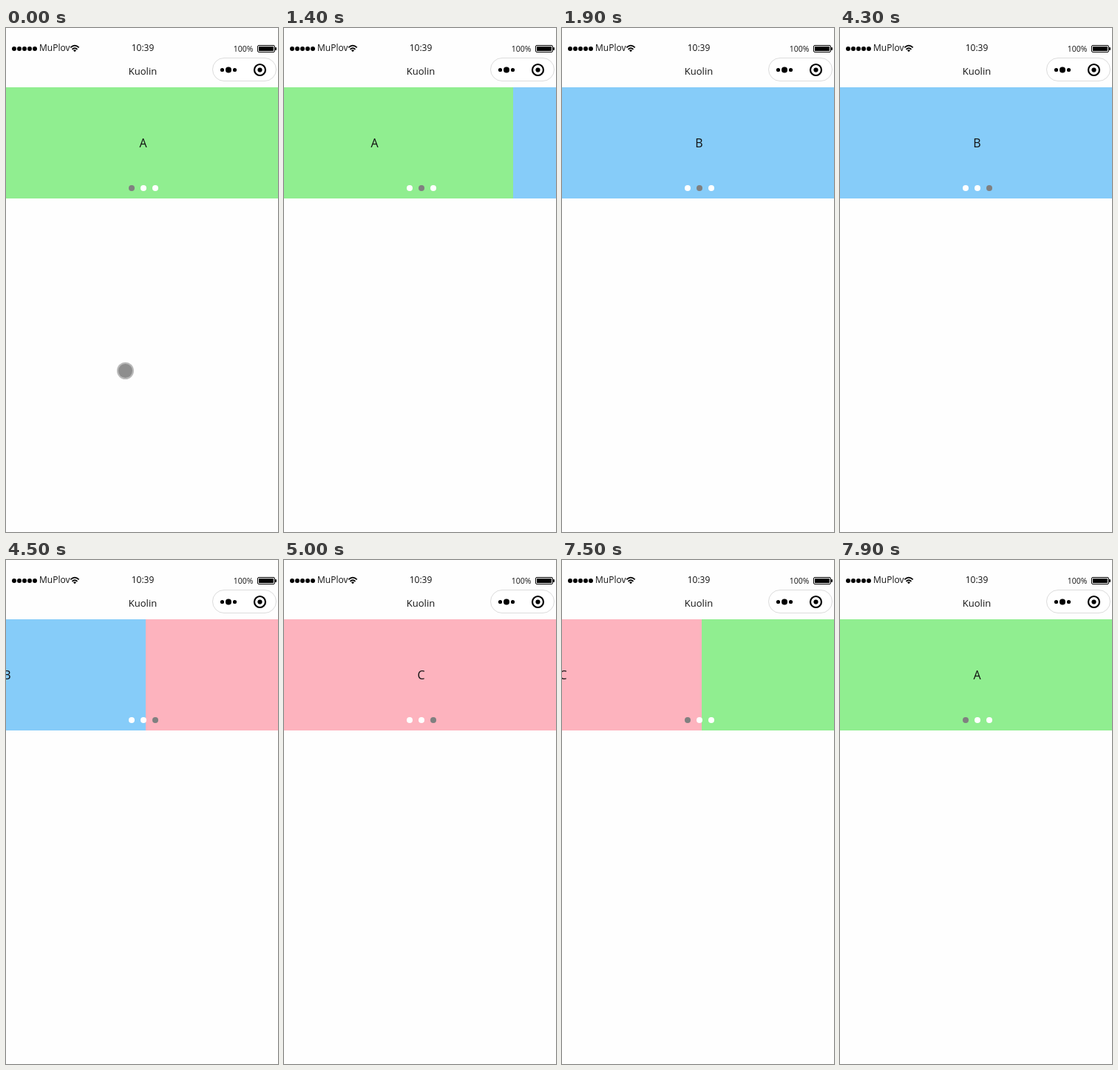
Recreate the animation shown at these times as an HTML page. Size 368 by 680 pixels, loop 8.1 s.

```html
<!DOCTYPE html>
<html lang="en">
<head>
<meta charset="utf-8">
<title>Swiper</title>
<style>
  html, body { margin: 0; width: 100%; height: 100%; overflow: hidden; background: #fefefe; }
  svg { display: block; width: 368px; height: 680px; }
  text { font-family: "Open Sans", "Noto Sans", sans-serif; fill: #111; text-anchor: middle; }
</style>
</head>
<body>
<svg viewBox="0 0 368 680">
  <rect width="368" height="680" fill="#fefefe"/>
  <g id="signal"></g>
  <text x="45" y="31" font-size="12" style="text-anchor:start">MuPlov</text>
  <g fill="none" stroke="#000" stroke-width="1.7">
    <path d="M87.3 26.4Q93 20.8 98.7 26.4"/>
    <path d="M89.5 28.9Q93 25.3 96.5 28.9"/>
  </g>
  <path d="M91 30.2Q93 28.4 95 30.2L93 32.2Z"/>
  <text x="185" y="31" font-size="12">10:39</text>
  <text x="321" y="32" font-size="10.5">100%</text>
  <rect x="340.5" y="23.5" width="23" height="9" rx="1.5" fill="none" stroke="#000"/>
  <rect x="342" y="25" width="20" height="6"/>
  <rect x="364" y="26" width="2" height="4" rx="1"/>

  <text x="185" y="63" font-size="13">Kuolin</text>
  <rect x="279.5" y="40.5" width="86" height="31" rx="15.5" fill="#fff" stroke="#dcdcdc"/>
  <circle cx="292.5" cy="56.5" r="2.6"/>
  <circle cx="301" cy="56.5" r="4"/>
  <circle cx="309.5" cy="56.5" r="2.6"/>
  <circle cx="343.5" cy="56.5" r="7.5" fill="none" stroke="#000" stroke-width="2.2"/>
  <circle cx="343.5" cy="56.5" r="3.1"/>

  <g id="slides"></g>
  <g id="dots"></g>
  <g id="touch">
    <circle cx="161.5" cy="462.5" r="11.5" fill="#bababa"/>
    <circle cx="161.5" cy="462.5" r="9.5" fill="#8e8e8e"/>
  </g>
</svg>
<script>
const LOOP = 8100, STEP = 100, INTERVAL = 3000;
const FIRST_SWITCH = 1300, SLIDE_DELAY = 56, SLIDE_TIME = 500;
const LEFT = -1, WIDTH = 374;
const PAGES = [["A", "#90ee90"], ["B", "#86ccf9"], ["C", "#fdb3be"]];

const byId = id => document.getElementById(id);
const clamp = v => Math.max(0, Math.min(1, v));

function add(parent, tag, attrs, text = "") {
  const node = document.createElementNS("http://www.w3.org/2000/svg", tag);
  for (const key in attrs) node.setAttribute(key, attrs[key]);
  node.textContent = text;
  return parent.appendChild(node);
}

for (let i = 0; i < 5; i++) add(byId("signal"), "circle", { cx: 11 + 7 * i, cy: 28, r: 3 });

// The first page is repeated at the end so the carousel can wrap.
[...PAGES, PAGES[0]].forEach(([letter, fill], i) => {
  const x = LEFT + i * WIDTH;
  add(byId("slides"), "rect", { x, y: 80, width: WIDTH, height: 150, fill });
  add(byId("slides"), "text", { x: x + WIDTH / 2 - 0.5, y: 161, "font-size": 16 }, letter);
});

const dots = PAGES.map((_, i) => add(byId("dots"), "circle", { cx: 170 + 16 * i, cy: 216, r: 4 }));

// Constant deceleration towards the next page.
const easeOut = p => 1 - (1 - p) ** 2;

function draw(time) {
  const t = Math.floor((time % LOOP) / STEP) * STEP;
  let position = 0, switches = 0;
  for (let i = 0; i < PAGES.length; i++) {
    const since = t - FIRST_SWITCH - i * INTERVAL;
    if (since >= 0) switches++;
    position += easeOut(clamp((since - SLIDE_DELAY) / SLIDE_TIME));
  }
  byId("slides").setAttribute("transform", `translate(${-Math.round(position * WIDTH)} 0)`);
  dots.forEach((dot, i) =>
    dot.setAttribute("fill", i === switches % PAGES.length ? "#808080" : "#fff"));
  byId("touch").setAttribute("opacity", clamp((600 - t) / 300));
}

const start = performance.now();
function tick() {
  draw(performance.now() - start);
  requestAnimationFrame(tick);
}
tick();
</script>
</body>
</html>
```
